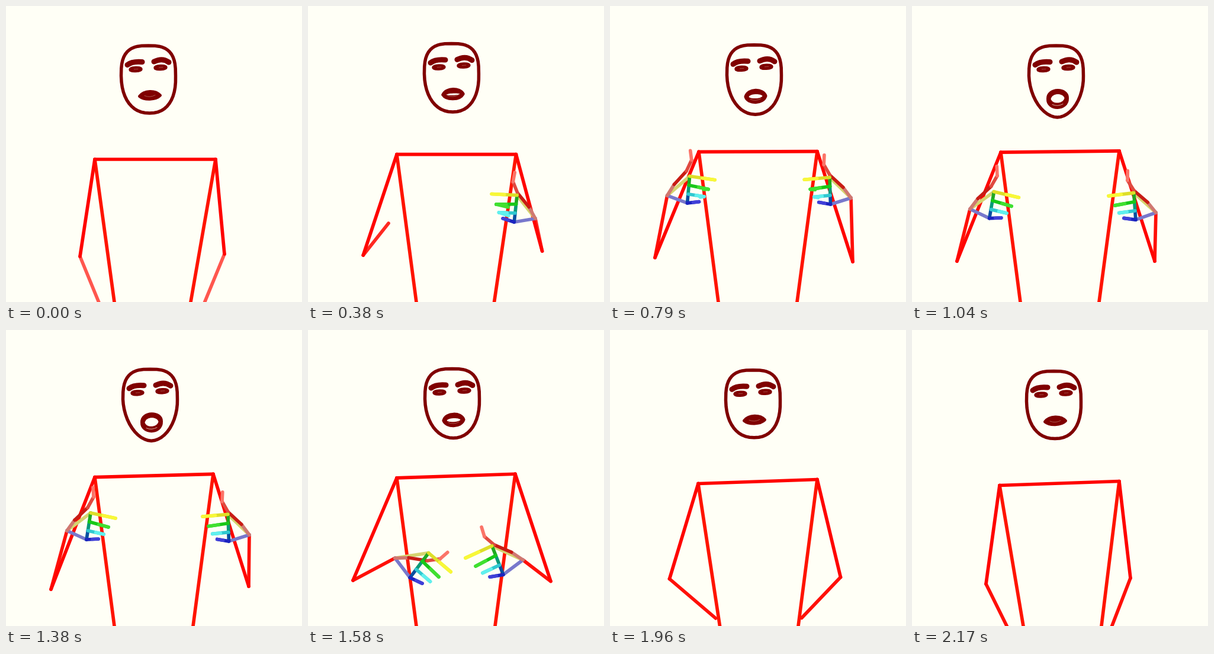
Recreate the animation shown at these times as an HTML page with a canvas. Size 500 px wide and 500 px high, loop 2.21 s.

```html
<!DOCTYPE html>
<html lang="en">
<head>
<meta charset="utf-8">
<title>Signing figure</title>
<style>
  html, body { margin: 0; width: 100%; height: 100%; overflow: hidden; background: #fffff6; }
  canvas { display: block; width: 500px; height: 500px; }
</style>
</head>
<body>
<canvas id="stage" width="500" height="500"></canvas>
<script>
const ctx = document.getElementById('stage').getContext('2d');
const LOOP = 2210, FPS = 24;
const PAPER = '#fffff6', INK = '#800000';

// Key values of the free movements at these steps
const KEYS = [0, 9, 14, 25, 33, 42, 52];
const TRACK = {
  elbowL: [423, 421, 421, 431, 438, 413, 429],
  elbowR: [419, 414, 430, 431, 433, 418, 419],
  wristX: [248, 260, 251, 255, 257, 253, 250],
  reach: [77, 124, 149, 157, 154, 75, 80],
  wristL: [535, 367, 310, 343, 339, 430, 520],
  wristR: [526, 359, 311, 349, 346, 430, 520],
  turnL: [-8, -8, -8, 1, 0, 49, 49],
  turnR: [-15, -15, -10, -5, -7, 27, 27],
  nod: [0, -3.5, -2.5, 0, -.8, -1.5, 2.5],
  mouth: [0, .22, .06, 1, 1, 0, 0]
};

// One open hand, measured from the wrist
const THUMB = [[13, -18], [35, -39], [45, -57], [44, -73]];
const INDEX = [40, -30], LITTLE = [33, 15];
const TIPS = [[82, -21], [70, -6], [62, 6], [53, 14]];
const FINGER_INKS = [['#dede28', '#f8f838'], ['#18c818', '#40e030'],
  ['#30c8d0', '#60f0ee'], ['#1c24c0', '#4040d8']];
const PALM_INKS = ['#20a820', '#0a9a78', '#0a50a0'];
const THUMB_INKS = ['#d07870', '#c81c14', '#e04a40', '#fb7468'];

const mix = (a, b, k) => a + (b - a) * k;
const mixPoint = (p, q, k) => [mix(p[0], q[0], k), mix(p[1], q[1], k)];
const clamp = v => Math.min(1, Math.max(0, v));

function ramp(from, to, step) {
  const k = clamp((step - from) / (to - from));
  return k * k * (3 - 2 * k);
}

// Smooth curve through a track, with no speed at either end
function follow(values, step) {
  const last = KEYS.length - 1;
  const slope = i => i === 0 || i === last ? 0
    : (values[i + 1] - values[i - 1]) / (KEYS[i + 1] - KEYS[i - 1]);
  const i = Math.min(last, Math.max(1, KEYS.findIndex(key => key > step))) - 1;
  if (step >= KEYS[last]) return values[last];
  const span = KEYS[i + 1] - KEYS[i], k = (step - KEYS[i]) / span;
  const s = k * k * (3 - 2 * k);
  return mix(values[i], values[i + 1], s)
    + span * k * (1 - k) * (slope(i) * (1 - k) - slope(i + 1) * k);
}

function line(points, color, width = 5.7, closed = false) {
  ctx.beginPath();
  points.forEach(p => ctx.lineTo(p[0], p[1]));
  if (closed) ctx.closePath();
  ctx.strokeStyle = color;
  ctx.lineWidth = width;
  ctx.stroke();
}

function arc(from, bend, to, color, width) {
  ctx.beginPath();
  ctx.moveTo(...from);
  ctx.quadraticCurveTo(...bend, ...to);
  ctx.strokeStyle = color;
  ctx.lineWidth = width;
  ctx.stroke();
}

function drawArm(shoulder, elbow, wrist, hip, opacity) {
  line([shoulder, hip], '#ff1400');
  ctx.globalAlpha = opacity;
  line([elbow, wrist], '#ff1008');
  ctx.globalAlpha = 1;
  line([shoulder, elbow], '#ff0400');
}

// side is 1 for the left hand and -1 for its mirror image
function drawHand(wrist, side, step, turn, thumbTurn) {
  const spread = ramp(33, 42, step);
  const curl = .6 * (1 - ramp(14, 23, step));
  const place = ([x, y], degrees, size) => {
    const a = degrees * Math.PI / 180, c = Math.cos(a) * size, s = Math.sin(a) * size;
    return [wrist[0] + side * (x * c - y * s), wrist[1] + x * s + y * c];
  };
  const palm = p => place(p, turn, 1 + .25 * spread);
  const thumb = THUMB.map(p => place(p, turn + thumbTurn, 1 + .08 * spread));
  const index = palm(INDEX), little = palm(LITTLE);
  const knuckles = [0, 1, 2, 3].map(i => mixPoint(index, little, i / 3));

  line([wrist, index], '#d6d470');
  line([wrist, little], '#7878cc');
  THUMB_INKS.forEach((ink, i) => line([i ? thumb[i - 1] : wrist, thumb[i]], ink));
  PALM_INKS.forEach((ink, i) => line([knuckles[i], knuckles[i + 1]], ink));

  FINGER_INKS.forEach(([near, far], i) => {
    const base = knuckles[i], tip = palm(TIPS[i]);
    line([base, tip], near);
    line([mixPoint(base, tip, .5), tip], far);
    if (curl && (i === 1 || i === 2)) {
      const [x, y] = mixPoint(tip, base, curl);
      line([tip, [x, y + 8 * curl]], far);
    }
  });
}

function drawEye(x, y) {
  ctx.beginPath();
  ctx.ellipse(x, y, 9.5, 3, -.05, 0, 7);
  ctx.fillStyle = ctx.strokeStyle = INK;
  ctx.lineWidth = 4.5;
  ctx.fill();
  ctx.stroke();
  line([[x - 3, y], [x + 4, y - .5]], '#a04a42', 1);
}

function lips(w, top, bottom, round) {
  const c = w * round;
  ctx.beginPath();
  ctx.moveTo(-w, 1);
  ctx.bezierCurveTo(-c, -top, c, -top, w, -.5);
  ctx.bezierCurveTo(c, bottom, -c, bottom, -w, 1);
  ctx.closePath();
}

function drawMouth(x, y, open) {
  ctx.save();
  ctx.translate(x, y);
  ctx.fillStyle = ctx.strokeStyle = INK;
  ctx.lineWidth = 5;
  lips(17.5 - open, mix(9.5, 18, open), mix(7.5, 20.5, open), mix(.55, 1.05, open));
  ctx.fill();
  ctx.stroke();
  ctx.fillStyle = PAPER;
  lips(11.5, 9.5 * open, 10 * open, .8);
  if (open > .1) ctx.fill();
  const lip = mix(1, 11.5, open);
  arc([-9, lip - 1], [0, lip + 3], [9, lip - 2], open > .5 ? '#d8b0a0' : '#a85a50', 1);
  ctx.restore();
}

// Egg outline: flatter above the middle, longer below as the jaw drops
function headOutline(open) {
  return Array.from({ length: 48 }, (_, i) => {
    const a = i / 24 * Math.PI, c = Math.cos(a), s = Math.sin(a);
    const power = s < 0 ? 2.9 : 2.3 - .4 * open;
    const height = s < 0 ? 51 : 63 + 7 * open;
    const bow = v => Math.sign(v) * Math.abs(v) ** (2 / power);
    return [240.5 + 46 * bow(c) + Math.max(0, s) * 2, 118 + height * bow(s)];
  });
}

function drawFace(dx, dy, open) {
  ctx.save();
  ctx.translate(dx, dy);
  line(headOutline(open), INK, 5.5, true);
  arc([205, 99.5], [213, 93], [230, 94.5], INK, 9);
  arc([250, 94], [264, 87], [275, 95], INK, 9);
  drawEye(219, 107);
  drawEye(261, 104);
  drawMouth(243, 151.5 + open * 4.5, open);
  ctx.restore();
}

function draw(step) {
  const at = name => follow(TRACK[name], step);
  const rise = ramp(0, 15, step), fall = ramp(42, 52, step);
  const raised = rise - fall;
  const shoulderY = 259 - 13 * (rise - ramp(36, 52, step));
  const tilt = 3.5 * ramp(14, 42, step);
  const elbowX = 247 - 4 * raised, elbowOut = 122 + 45 * raised;
  const wristX = at('wristX'), reach = at('reach');

  const shoulderL = [150 - 2 * fall, shoulderY + tilt];
  const shoulderR = [354 - 4 * rise, shoulderY - tilt];
  const wristL = [wristX - reach, at('wristL')];
  const wristR = [wristX + reach, at('wristR')];

  ctx.fillStyle = PAPER;
  ctx.fillRect(0, 0, 500, 500);
  ctx.lineCap = ctx.lineJoin = 'round';

  const opacity = mix(.7, 1, rise);
  drawArm(shoulderL, [elbowX - elbowOut, at('elbowL')], wristL, [183 + 5 * fall, 500], opacity);
  drawArm(shoulderR, [elbowX + elbowOut, at('elbowR')], wristR, [312 + 4 * rise + 4 * fall, 500], opacity);
  line([shoulderL, shoulderR], '#ff0400');

  if (step >= 6 && step < 47) drawHand(wristR, -1, step, at('turnR'), 8);
  if (step >= 10 && step < 47) drawHand(wristL, 1, step, at('turnL'), 42 * ramp(33, 42, step));

  drawFace(3 * rise - 4 * fall, at('nod'), clamp(at('mouth')));
}

// Steps run at 24 per second, with their starts rounded to 10 ms
function tick() {
  const t = Math.floor(performance.now() % LOOP / 10) * 10;
  draw(Math.floor((t + 4.9) * FPS / 1000));
  requestAnimationFrame(tick);
}
tick();
</script>
</body>
</html>
```
